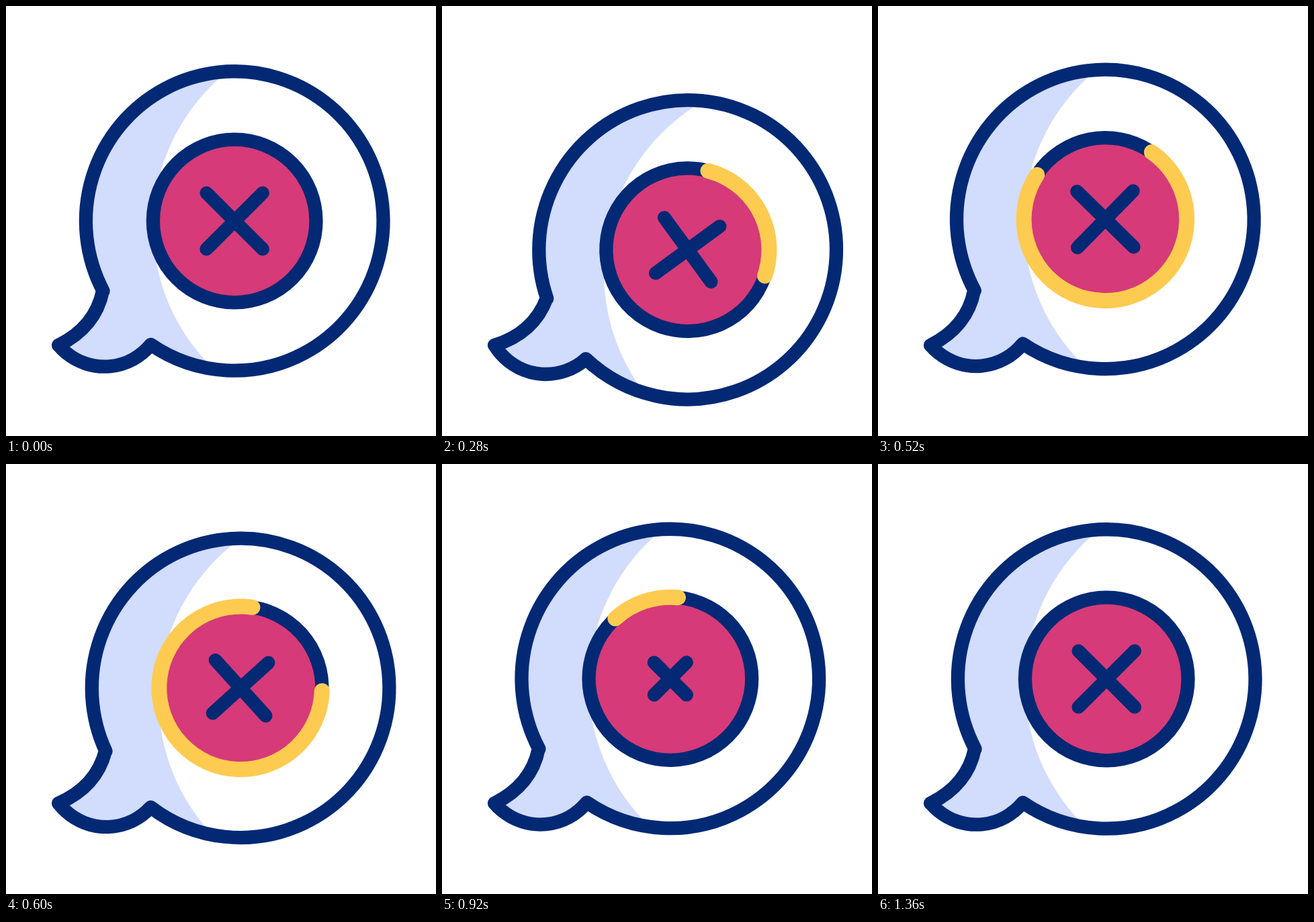
Write an HTML page with a canvas that moves like this. It is 640 by 640 pixels and loops after 1480 ms.

```html
<!DOCTYPE html>
<html lang="en">
<head>
<meta charset="utf-8">
<title>Speech bubble</title>
<style>
  html, body { margin: 0; width: 100%; height: 100%; overflow: hidden; background: #fff; }
  canvas { display: block; width: 100vmin; height: 100vmin; }
</style>
</head>
<body>
<canvas id="stage" width="640" height="640"></canvas>
<script>
const ctx = document.getElementById("stage").getContext("2d");
const LOOP = 1480, STEP = 40, REST_AT = 1360;
const NAVY = "#032975", PINK = "#d63a78", PALE = "#d2dcfd", YELLOW = "#fecb51";
const TIP = { x: 78, y: 505 };
const CENTER = { x: 340.2, y: 320 };
const RING = 121.3;
const rad = degrees => degrees * Math.PI / 180;

const linear = p => p;
const sine = p => (1 - Math.cos(Math.PI * p)) / 2;

// Keys are [time in ms, value] pairs.
function track(keys, time, ease) {
  if (time <= keys[0][0]) return keys[0][1];
  for (let i = 1; i < keys.length; i++) {
    const [t0, a] = keys[i - 1], [t1, b] = keys[i];
    if (time < t1) return a + (b - a) * ease((time - t0) / (t1 - t0));
  }
  return keys[keys.length - 1][1];
}

const TILT = [[80, 0], [273, 9.1], [380, -11], [590, 2.9], [750, -1.3], [960, 0]];
const CROSS = [[540, 41.8], [800, 23.5], [860, 23.5], [1360, 41.8]];
const SWEEP_HEAD = [[169, 0], [593, 360]];
const SWEEP_TAIL = [[476, 0], [720, 164.5], [985, 360]];

const bubble = new Path2D();
bubble.moveTo(TIP.x, TIP.y);
bubble.quadraticCurveTo(133, 478, 144, 424);
bubble.ellipse(CENTER.x, CENTER.y, 221.3, 222.7, 0, rad(152.1), rad(484.3));
bubble.arc(146.5, 447.5, 89.2, rad(39.8), rad(140));
bubble.closePath();

function stroke(color, width, path) {
  ctx.strokeStyle = color;
  ctx.lineWidth = width;
  path ? ctx.stroke(path) : ctx.stroke();
}

function circle(x, y, r, from = 0, to = 360) {
  ctx.beginPath();
  ctx.arc(x, y, r, rad(from), rad(to));
}

function drawBubble() {
  ctx.save();
  ctx.clip(bubble);
  ctx.fillStyle = PALE;
  ctx.fill(bubble);
  ctx.fillStyle = "#fff";
  circle(513.8, 327.8, 295);
  ctx.fill();
  ctx.restore();
  stroke(NAVY, 20.3, bubble);
}

function drawButton(time) {
  const { x, y } = CENTER;
  circle(x, y, RING);
  ctx.fillStyle = PINK;
  ctx.fill();
  stroke(NAVY, 20.3);

  const arm = track(CROSS, time, sine);
  ctx.beginPath();
  for (const side of [-1, 1]) {
    ctx.moveTo(x - arm, y - arm * side);
    ctx.lineTo(x + arm, y + arm * side);
  }
  stroke(NAVY, 20);

  const head = track(SWEEP_HEAD, time, linear);
  const tail = track(SWEEP_TAIL, time, linear);
  if (head > tail) {
    circle(x, y, RING, tail - 84.4, head - 84.4);
    stroke(YELLOW, 23);
  }
}

function draw(time) {
  ctx.fillStyle = "#fff";
  ctx.fillRect(0, 0, 640, 640);
  ctx.save();
  ctx.translate(TIP.x, TIP.y);
  ctx.rotate(rad(track(TILT, time, sine)));
  ctx.translate(-TIP.x, -TIP.y);
  ctx.lineCap = ctx.lineJoin = "round";
  drawBubble();
  drawButton(time);
  ctx.restore();
}

const start = performance.now();
function tick() {
  const time = (performance.now() - start) % LOOP;
  const held = Math.floor(time / STEP) * STEP;
  draw(held < 120 ? REST_AT : held);
  requestAnimationFrame(tick);
}
tick();
</script>
</body>
</html>
```
